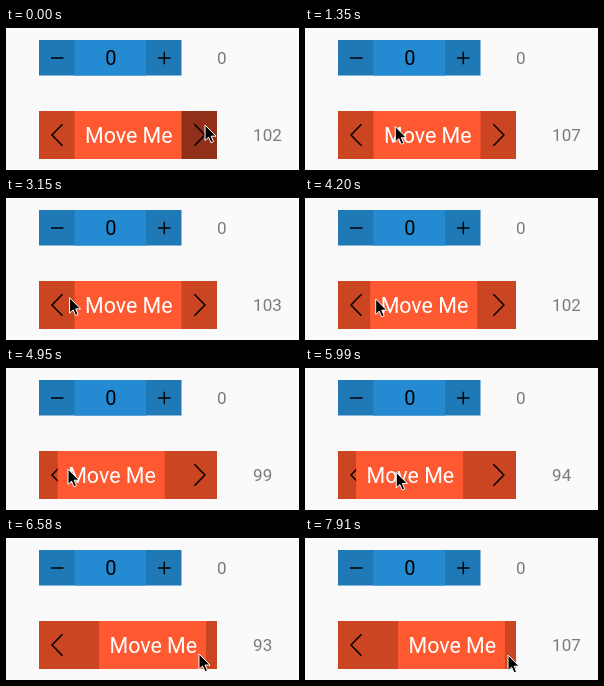
These frames come from a looping animation (293 px wide and 142 px high, 8000 ms). An HTML page:

```html
<!DOCTYPE html>
<html lang="en">
<head>
<meta charset="utf-8">
<title>Steppers</title>
<style>
  html, body { margin: 0; width: 100%; height: 100%; overflow: hidden; background: #fafafa; }
  svg { display: block; width: 100%; height: 100%; }
  text { font-family: Roboto, sans-serif; }
  .readout { font-size: 17px; fill: #7b7b7b; }
  .icon { fill: none; stroke: #000; stroke-width: 1.5; }
</style>
</head>
<body>
<svg viewBox="0 0 293 142">
  <rect x="33" y="12" width="142.5" height="35.5" fill="#1f79b7"/>
  <rect x="68.5" y="12" width="71.5" height="35.5" fill="#248bd2"/>
  <path class="icon" d="M45 30H57.5M152 30H164.5M158.3 23.7V36.3"/>
  <text x="104.8" y="37" font-size="20" text-anchor="middle">0</text>
  <text class="readout" x="211.1" y="36">0</text>

  <rect x="33" y="83" width="178" height="48" fill="#cc4522"/>
  <rect id="leftPress" x="33" y="83" width="36" height="48" fill="#91301a"/>
  <rect id="rightPress" x="175" y="83" width="36" height="48" fill="#91301a"/>
  <path class="icon" d="M56.5 96.3L46 107L56.5 117.7M188.4 96.3L198.9 107L188.4 117.7"/>
  <g id="tile">
    <rect x="68.5" y="83" width="107" height="48" fill="#ff5931"/>
    <text x="122.8" y="115.3" font-size="21.4" fill="#fff" text-anchor="middle">Move Me</text>
  </g>
  <text id="count" class="readout" x="247.1" y="113"></text>
  <path id="cursor" d="M0 0V15.5L3.6 12.2L6 17.8L8.5 16.7L6.1 11.2H11Z" fill="#000" stroke="#fff"/>
</svg>
<script>
const LOOP = 8000;
const el = id => document.getElementById(id);
const clamp = p => Math.min(1, Math.max(0, p));
const easeOut = p => 1 - (1 - p) ** 2;
const easeInOut = p => p * p * (3 - 2 * p);

const cursorMoves = [
  { at: 1050, time: 600, to: [54, 99] },   // over to the left button
  { at: 3050, time: 550, to: [83, 101] },  // onto the tile
  { at: 3950, time: 700, to: [62, 101] },  // drag left
  { at: 5880, time: 950, to: [203, 117] }  // drag right
];
const tileMoves = [
  { at: 4020, time: 630, to: [-16.8] },
  { at: 5690, time: 150, to: [-24.5] },
  { at: 5850, time: 560, to: [24.5] }
];
const tickRuns = [
  { at: 150, every: 300, ticks: 5, by: 1 },
  { at: 2100, every: 350, ticks: 4, by: -1 },
  { at: 4050, every: 297, ticks: 7, by: -1 },
  { at: 5890, every: 90, ticks: 3, by: -1 },
  { at: 6647, every: 97, ticks: 14, by: 1 }
];

// Each move eases from wherever the previous one ended.
const follow = (from, moves, ease, t) => moves.reduce((pos, { at, time, to }) => {
  const p = ease(clamp((t - at) / time));
  return pos.map((v, i) => v + (to[i] - v) * p);
}, from);

const countAt = t => tickRuns.reduce((sum, { at, every, ticks, by }) => {
  const done = Math.floor((t - at) / every) + 1;
  return sum + by * Math.min(ticks, Math.max(0, done));
}, 102);

// The picture is held between discrete steps.
function hold(t) {
  const [start, step] = t < 5540 ? [0, 150] : [5540, 148.1];
  return start + Math.floor((t - start) / step) * step;
}

const show = (id, visible) => el(id).setAttribute("visibility", visible ? "visible" : "hidden");
const move = (id, [x, y = 0]) => el(id).setAttribute("transform", `translate(${x} ${y})`);

function draw(now) {
  const t = hold(now % LOOP);
  show("rightPress", t < 1200);
  show("leftPress", t >= 1950 && t < 3150);
  move("tile", follow([0], tileMoves, easeInOut, t));
  move("cursor", follow([199, 97], cursorMoves, easeOut, t));
  el("count").textContent = countAt(t);
}

const start = performance.now();
function frame() {
  draw(performance.now() - start);
  requestAnimationFrame(frame);
}
frame();
</script>
</body>
</html>
```
